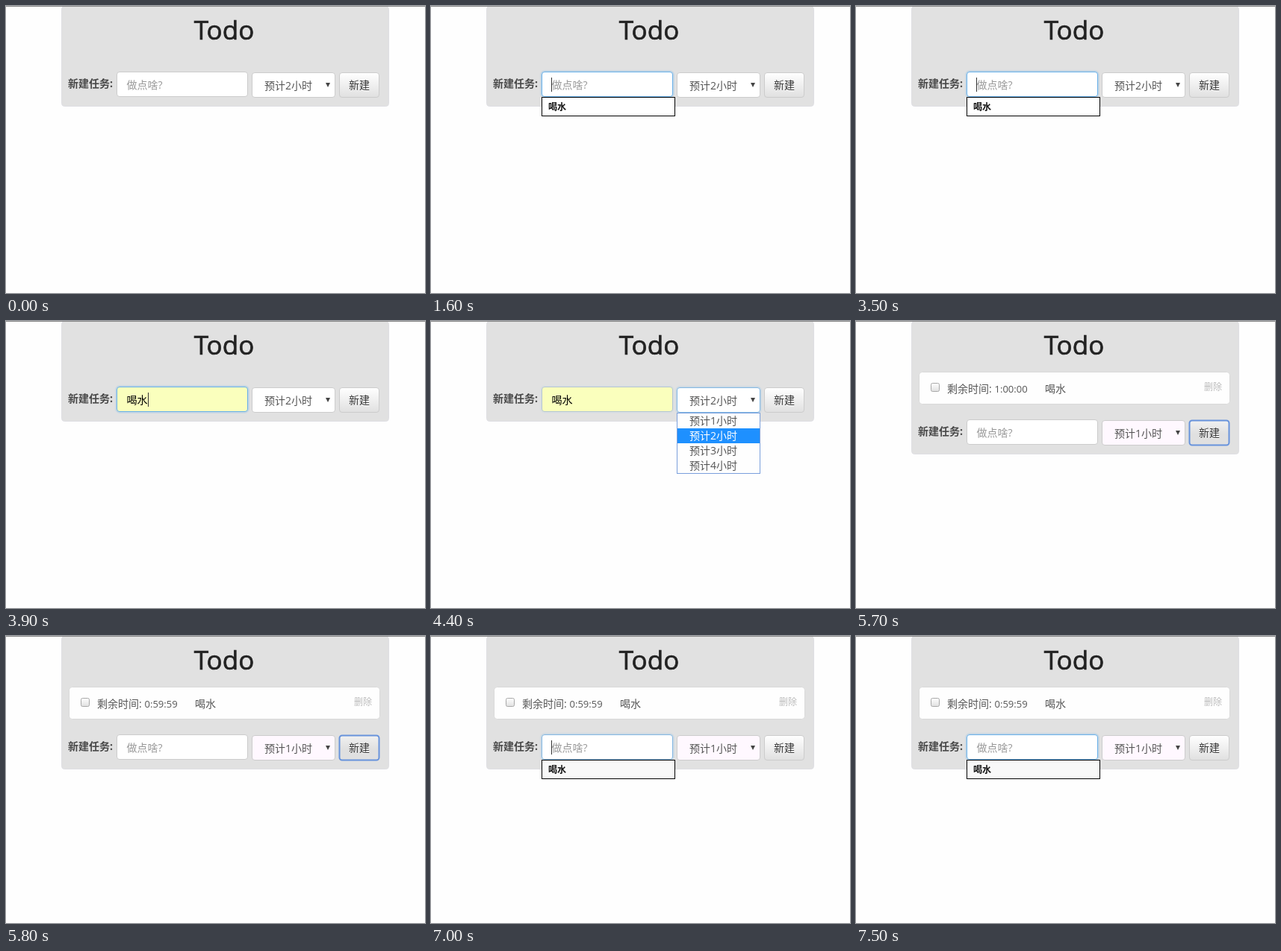
An HTML page for the animation above (8 s loop, 561 by 385 pixels).

```html
<!DOCTYPE html>
<html lang="zh-CN">
<head>
<meta charset="utf-8">
<title>Todo</title>
<style>
html, body { margin: 0; width: 100%; height: 100%; overflow: hidden; background: #fefefe; }
svg { display: block; width: 561px; height: 385px; }
text { font: 14px "Open Sans", "Noto Sans CJK SC", "Noto Sans CJK", sans-serif; fill: #555; white-space: pre; }
</style>
</head>
<body>
<svg id="stage" viewBox="0 0 561 385" xmlns="http://www.w3.org/2000/svg">
  <defs>
    <linearGradient id="plain" x1="0" y1="0" x2="0" y2="1">
      <stop offset="0" stop-color="#fff"/><stop offset="1" stop-color="#e0e0e0"/>
    </linearGradient>
    <linearGradient id="hover" x1="0" y1="0" x2="0" y2="1">
      <stop offset="0" stop-color="#f1f1f1"/><stop offset=".55" stop-color="#e0e0e0"/>
    </linearGradient>
  </defs>
</svg>
<script>
const LOOP = 8000;
const BLUE = [102, 175, 233], GREY = [204, 204, 204];
const stage = document.getElementById('stage');

function add(parent, tag, attrs, content) {
  const el = document.createElementNS('http://www.w3.org/2000/svg', tag);
  set(el, attrs);
  if (content) el.textContent = content;
  parent.appendChild(el);
  return el;
}
function set(el, attrs) {
  for (const key in attrs) el.setAttribute(key, attrs[key]);
}
function show(el, on) {
  el.style.display = on ? '' : 'none';
}
function box(parent, x, y, w, h, rx, fill, stroke) {
  return add(parent, 'rect', { x: x + .5, y: y + .5, width: w - 1, height: h - 1, rx, fill, stroke });
}
function label(parent, x, y, content, style = '') {
  return add(parent, 'text', { x, y, style }, content);
}
// Form field with a soft ring that follows its focus level.
function field(parent, x, y, w, h) {
  const ring = add(parent, 'rect', { x: x - .5, y: y - .5, width: w + 1, height: h + 1, rx: 5, fill: 'none', stroke: '#66afe9', 'stroke-width': 3 });
  const rect = box(parent, x, y, w, h, 3.5, '#fff', '#ccc');
  return (level, fill) => {
    const mix = GREY.map((c, i) => Math.round(c + (BLUE[i] - c) * level));
    set(rect, { fill, stroke: `rgb(${mix})` });
    set(ring, { 'stroke-opacity': level * .2 });
  };
}

const panel = box(stage, 74, 0, 439, 135, 4, '#e1e1e1', '#dfdfe3');
add(stage, 'rect', { width: 561, height: 1, fill: '#8a8a8a' });
label(stage, 292, 45, 'Todo', 'font-size:35px;fill:#222;stroke:#222;stroke-width:.7px;text-anchor:middle');

const task = add(stage, 'g', {});
box(task, 84, 68, 417, 44, 4, '#fefefe', '#d9d9d9');
box(task, 100, 83, 12, 12, 2, 'url(#plain)', '#a8a8a8');
label(task, 122, 96, '剩余时间:');
const clock = label(task, 185.5, 95.5, '', 'font-size:13px');
label(task, 253, 96, '喝水');
label(task, 466, 93, '删除', 'font-size:12px;fill:#bbb');

const form = add(stage, 'g', {});
label(form, 83, 109, '新建任务:', 'font-weight:bold;fill:#484848');

const input = field(form, 148, 88, 176, 34);
const hint = label(form, 161.5, 111, '做点啥?', 'fill:#999');
const value = label(form, 161.5, 111, '喝水', 'fill:#000');
const caret = add(form, 'rect', { y: 96, width: 1, height: 19, fill: '#333' });

const select = field(form, 329, 89, 112, 34);
const choice = label(form, 346, 112, '');
add(form, 'path', { d: 'M428 103h6l-3 6z', fill: '#444' });

const button = box(form, 446, 89, 54, 34, 3.5, 'url(#plain)', '#ccc');
label(form, 459, 111, '新建', 'fill:#333;text-shadow:0 1px 0 #fff');

const suggest = add(form, 'g', {});
const suggestBox = box(suggest, 148, 122, 179, 26, 0, '#fff', '#000');
label(suggest, 157, 139.5, '喝水', 'font-size:12px;font-weight:bold;fill:#111');

const menu = add(form, 'g', {});
box(menu, 329, 123, 112, 82, 0, '#fefefe', '#7a9fdc');
const bar = add(menu, 'rect', { x: 330, width: 110, height: 20, fill: '#1e90ff' });
const options = [1, 2, 3, 4].map((n, i) => label(menu, 346, 139 + 20 * i, `预计${n}小时`));

function draw(t) {
  const within = (a, b) => t >= a && t < b;
  // Focus eases in and out over two steps, covering most of the way in the first.
  const focus = (a, b) => !within(a, b + 100) ? 0 : t < a + 100 ? .75 : t >= b ? .25 : 1;

  const added = t >= 5700;
  const filled = within(3600, 5700);
  const preview = within(3600, 3900);
  const hours = t < 5000 ? 2 : 1;

  set(form, { transform: `translate(0 ${added ? 44 : 0})` });
  set(panel, { height: added ? 178 : 134 });
  show(task, added);
  clock.textContent = t < 5800 ? '1:00:00' : '0:59:59';

  input(Math.max(focus(600, 4400), focus(7000, LOOP)), filled ? '#faffbd' : '#fff');
  show(hint, !filled);
  show(value, filled);
  show(caret, within(600, 1100) || within(1600, 2100) || within(2500, 3000) ||
    within(3500, 3600) || within(3900, 4400) || within(7000, 7500));
  set(caret, { x: filled ? 190 : 161 });

  show(suggest, within(600, 3900) || t >= 7000);
  set(suggestBox, { fill: preview ? '#cdcdcd' : added ? '#f8f8f8' : '#fff' });

  select(focus(4400, 5600), added ? '#fff8ff' : '#fff');
  choice.textContent = `预计${hours}小时`;
  const picked = t < 4700 ? 1 : 0;
  show(menu, within(4400, 5000));
  set(bar, { y: 124 + 20 * picked });
  options.forEach((o, i) => { o.style.fill = i === picked ? '#fff' : '#555'; });

  const active = within(5600, 7000);
  set(button, {
    fill: within(5100, 7000) ? 'url(#hover)' : 'url(#plain)',
    stroke: active ? '#6893dc' : '#ccc',
    'stroke-width': active ? 2 : 1
  });
}

function tick() {
  draw(performance.now() % LOOP);
  requestAnimationFrame(tick);
}
tick();
</script>
</body>
</html>
```
